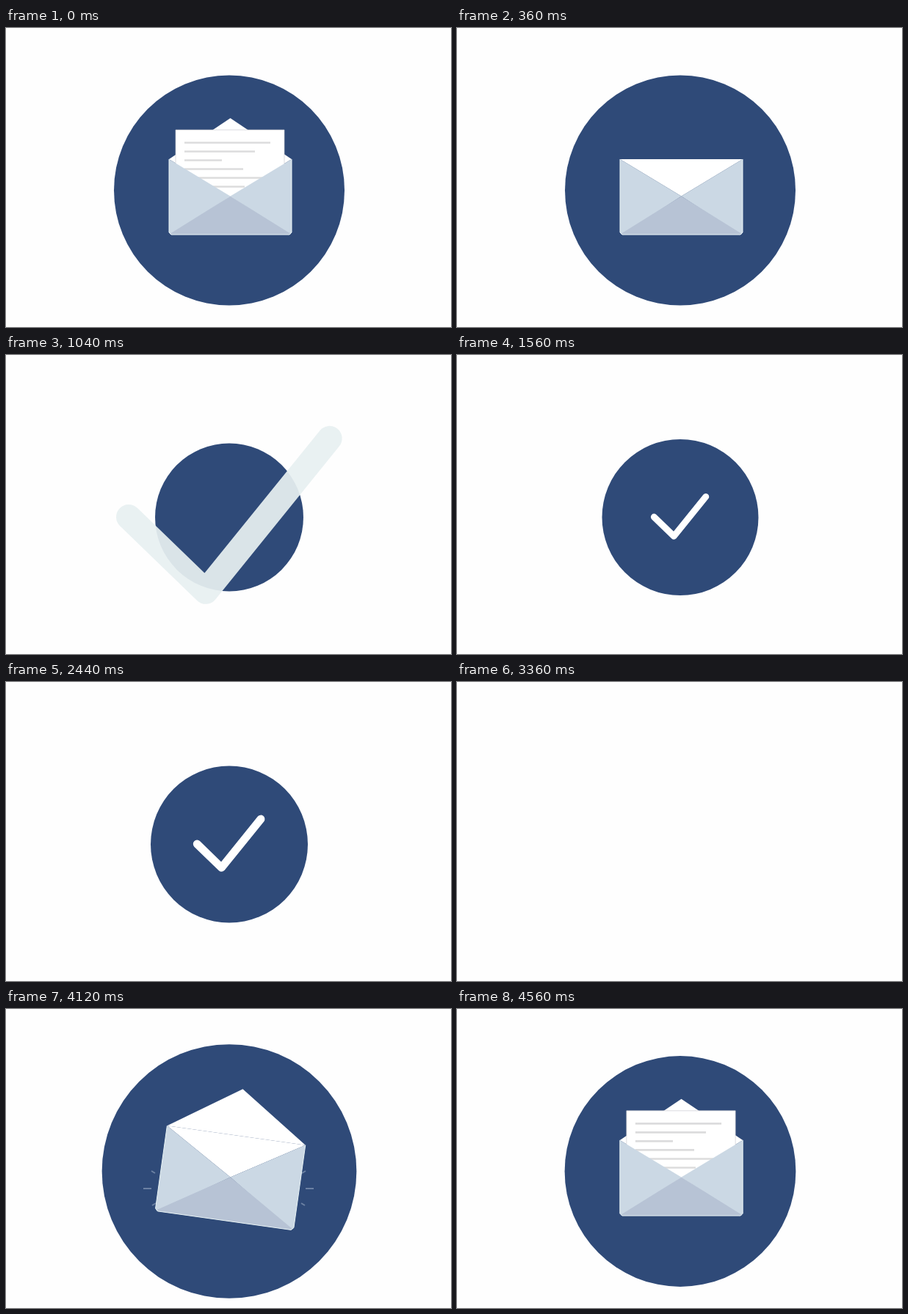
An HTML page with a canvas that plays this animation: 606 px wide and 408 px high, repeating every 4600 ms.

```html
<!DOCTYPE html>
<html>
<head>
<meta charset="utf-8">
<style>
html, body { margin: 0; width: 100%; height: 100%; overflow: hidden; background: #fefefe; }
canvas { display: block; }
</style>
</head>
<body>
<canvas id="stage" width="606" height="408"></canvas>
<script>
const ctx = document.getElementById('stage').getContext('2d');
const LOOP = 4600, STEP = 40;
const CX = 304, CY = 221.5;
const BLUE = '#2f4a78';

const span = (t, from, to) => Math.min(1, Math.max(0, (t - from) / (to - from)));
const mix = (a, b, k) => a + (b - a) * k;
const smooth = k => k * k * (3 - 2 * k);
const elastic = (u, period) =>
  u <= 0 ? 0 : u >= 1 ? 1 : 1 - 2 ** (-10 * u) * Math.cos(2 * Math.PI * u / period);

function disc(r) {
  ctx.fillStyle = BLUE;
  ctx.beginPath();
  ctx.arc(CX, CY, Math.max(0, r), 0, 7);
  ctx.fill();
}

// Envelope points are relative to its middle; tilt turns it about the horizontal axis.
function projector({ scale, spin, tilt, lift }) {
  const c = Math.cos(spin), s = Math.sin(spin);
  return ([x, y]) => {
    const f = scale * 710 / (710 - y * Math.sin(tilt) * scale);
    const px = x * f, py = y * Math.cos(tilt) * f;
    return [305.5 + px * c - py * s, 230 - lift + px * s + py * c];
  };
}

function envelope(pose) {
  const at = projector(pose);
  const trace = pts => {
    ctx.beginPath();
    pts.forEach(p => ctx.lineTo(...at(p)));
  };
  const poly = (color, ...pts) => {
    trace(pts);
    ctx.closePath();
    ctx.fillStyle = color;
    ctx.fill();
  };
  const line = (color, width, ...pts) => {
    trace(pts);
    ctx.strokeStyle = color;
    ctx.lineWidth = width;
    ctx.stroke();
  };
  const L = -83.5, R = 83.5, T = -51, B = 52, mid = [0, -0.5];
  const fold = Math.cos(pose.fold * Math.PI);
  const flap = [[L, T], [0, T - (fold > 0 ? 56 : 51) * fold], [R, T]];

  if (fold > 0) poly('#fff', ...flap);
  poly('#fff', [L, T], [R, T], mid);

  if (pose.sink < 1) {
    const top = -91 + 92 * pose.sink;
    const low = Math.min(top + 110, 48);
    const sheet = [[-74.5, top], [73.5, top], [73.5, low], [-74.5, low]];
    poly('#fff', ...sheet);
    line('#ccccd2', 0.7, ...sheet, sheet[0]);
    [117, 96, 51, 80, 106, 82].forEach((w, i) => {
      const y = top + 17.5 + 12 * i;
      if (y < 45) line('#dcdcdd', 2.6 * pose.scale, [-62.5, y], [w - 62.5, y]);
    });
  }

  poly('#cbd8e4', [L, T], mid, [L + 3, B], [L, B - 3]);
  poly('#cbd8e4', [R, T], mid, [R - 3, B], [R, B - 3]);
  poly('#b7c3d5', [L + 1, B - 1], mid, [R - 1, B - 1], [R - 3, B], [L + 3, B]);
  if (fold < 0) poly('#e0eaf1', ...flap);
  line('#e9f4f6', 1, [L, T], [L, B - 3], [L + 3, B], [R - 3, B], [R, B - 3], [R, T]);
}

function ticks(k) {
  if (k <= 0 || k >= 1) return;
  const out = 8 * (k - 0.4);
  ctx.strokeStyle = `rgba(203,216,228,${0.65 * (1 - k)})`;
  ctx.lineWidth = 2;
  ctx.beginPath();
  for (const side of [-1, 1]) {
    for (const [x1, y1, x2, y2] of [[100, -6, 105, -9], [105, 15, 116, 15], [99, 35, 104, 38]]) {
      ctx.moveTo(303 + side * (x1 + out), 230 + y1);
      ctx.lineTo(303 + side * (x2 + out), 230 + y2);
    }
  }
  ctx.stroke();
}

function check(scale, alpha, whiten) {
  if (scale <= 0) return;
  ctx.save();
  ctx.translate(303.5, 221);
  ctx.scale(scale, scale);
  ctx.globalAlpha = alpha;
  ctx.strokeStyle = `rgb(${[232, 240, 242].map(v => Math.round(mix(v, 255, whiten)))})`;
  ctx.lineWidth = 10.8;
  ctx.lineCap = ctx.lineJoin = 'round';
  ctx.beginPath();
  ctx.moveTo(-43.3, 0);
  ctx.lineTo(-10, 32.3);
  ctx.lineTo(43.5, -34);
  ctx.stroke();
  ctx.restore();
}

function leave(t) {
  disc(mix(157, 107, elastic((t - 673) / 1350, 0.45)));
  const flip = span(t, 440, 700) ** 2;
  if (flip < 1) {
    envelope({
      scale: 1 - 0.41 * flip,
      spin: 0,
      tilt: flip * Math.PI / 2,
      lift: 36 * flip,
      sink: smooth(span(t, 0, 280)),
      fold: smooth(span(t, 240, 480))
    });
  }
}

function confirm(t) {
  const size = 1 - span(t, 3000, 3360) ** 2;
  if (t >= 3000) disc(107 * size);
  const drop = mix(5.5, 1, elastic((t - 932) / 1480, 0.7));
  check(drop * size, span(t, 932, 1048), span(t, 1040, 1240));
}

function arrive(t) {
  disc(157 * elastic((t - 3846) / 850, 0.6));
  const swing = span(t, 4040, 4440);
  ticks(span(t, 4040, 4240));
  envelope({
    scale: Math.max(0, elastic((t - 3880) / 850, 0.6)),
    spin: 10 * Math.PI / 180 * Math.sin(swing * 2.5 * Math.PI) * (1 - swing),
    tilt: 0,
    lift: 0,
    sink: 1 - smooth(span(t, 4200, 4520)),
    fold: 0
  });
}

function frame(now) {
  const t = Math.floor(now % LOOP / STEP) * STEP;
  ctx.fillStyle = '#fefefe';
  ctx.fillRect(0, 0, 606, 408);
  if (t < 3000) leave(t);
  if (t >= 932 && t < 3360) confirm(t);
  if (t >= 3846) arrive(t);
  requestAnimationFrame(frame);
}
requestAnimationFrame(frame);
</script>
</body>
</html>
```
